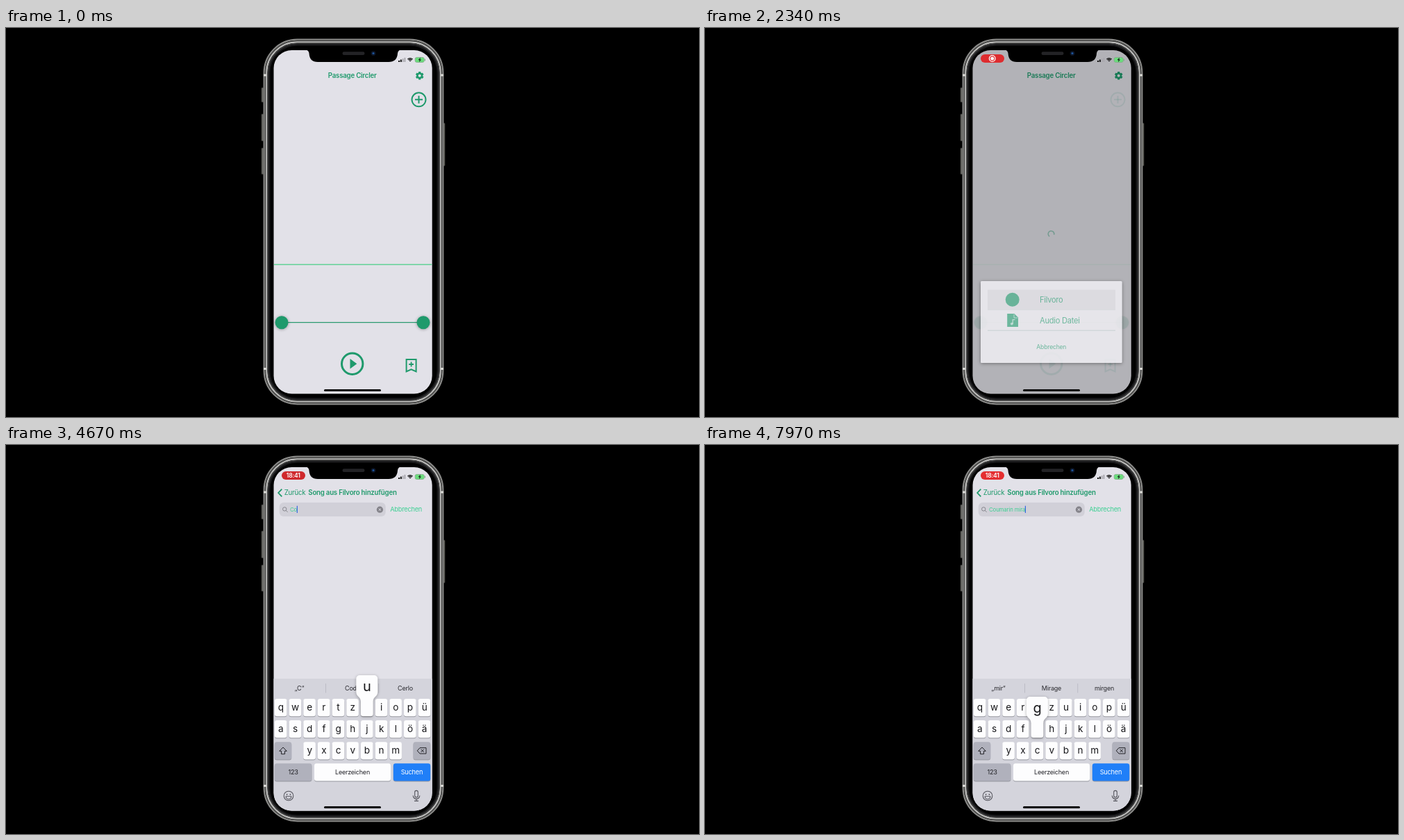
Animation of 998x561 px, one loop 8 s. Source, as an HTML page with a canvas:

```html
<!DOCTYPE html>
<html lang="de">
<head>
<meta charset="utf-8">
<title>Passage Circler</title>
<style>
html, body { margin: 0; width: 100%; height: 100%; overflow: hidden; background: #000; }
canvas { display: block; width: 100%; height: 100%; }
</style>
</head>
<body>
<canvas id="stage" width="998" height="561"></canvas>
<script>
const ctx = document.getElementById('stage').getContext('2d');
const LOOP = 8000, TAU = Math.PI * 2;
const GREEN = '#1f9a6c', MINT = '#3dcf93', PAPER = '#e2e1e8', CARD = '#f0eff3';
const SERVICE = 'Filvoro';
const ROWS = ['qwertzuiopü', 'asdfghjklöä', 'yxcvbnm'];
const PHRASE = 'Coumarin mirag';
const PRESSES = [3960, 4300, 4620, 4990, 5320, 5690, 5960, 6230, 6540, 6880, 7160, 7420, 7690, 7920];
const INSERT = 100, HOLD = 130, LAG = 280;
const HINTS = {
  C: ['Code', 'Cerlo'], Co: ['Code', 'Cool'], Cou: ['Couch', 'Coupon'], Coum: ['Coumarin', 'Comma'],
  Couma: ['Coumarin', ''], Coumar: ['Coumarin', ''], Coumari: ['Coumarin', ''], Coumarin: ['Coumarins', ''],
  m: ['mit', 'mir'], mi: ['mit', 'mir'], mir: ['Mirage', 'mirgen'], mira: ['Mirage', 'mirakel']
};

const clamp = v => Math.max(0, Math.min(1, v));
const ramp = (t, a, b) => clamp((t - a) / (b - a));
const smooth = p => p * p * (3 - 2 * p);
const easeOut = p => 1 - (1 - p) ** 3;
const mix = (a, b, p) => a + (b - a) * p;

function rr(x, y, w, h, r, fill, stroke, lw = 1) {
  ctx.beginPath();
  ctx.roundRect(x, y, w, h, r);
  paint(fill, stroke, lw);
}
function paint(fill, stroke, lw = 1) {
  if (fill) { ctx.fillStyle = fill; ctx.fill(); }
  if (stroke) { ctx.strokeStyle = stroke; ctx.lineWidth = lw; ctx.stroke(); }
}
function circle(x, y, r, fill, stroke, lw) {
  ctx.beginPath();
  ctx.arc(x, y, r, 0, TAU);
  paint(fill, stroke, lw);
}
function poly(points, stroke, lw, fill) {
  ctx.beginPath();
  points.forEach(([x, y], i) => i ? ctx.lineTo(x, y) : ctx.moveTo(x, y));
  if (fill) ctx.closePath();
  paint(fill, stroke, lw);
}
const line = (x1, y1, x2, y2, color, lw = 1) => poly([[x1, y1], [x2, y2]], color, lw);
function text(s, x, y, size, color, align = 'left', weight = 400) {
  ctx.font = `${weight} ${size}px Inter, sans-serif`;
  ctx.letterSpacing = -size * 0.023 + 'px';
  ctx.textAlign = align;
  ctx.textBaseline = 'alphabetic';
  ctx.fillStyle = color;
  ctx.fillText(s, x, y);
}
function layer(alpha, draw) {
  if (alpha <= 0) return;
  ctx.save();
  ctx.globalAlpha *= alpha;
  draw();
  ctx.restore();
}
function shadow(color, blur, dy = 0) {
  ctx.shadowColor = color;
  ctx.shadowBlur = blur;
  ctx.shadowOffsetY = dy;
}

function phoneBody() {
  [[86, 21], [124, 39], [173, 38]].forEach(([y, h]) => rr(368, y, 3.5, h, 1, '#73736f', '#30302e', 0.8));
  rr(629, 137, 3, 62, 1, '#85857f', '#30302e', 0.8);
  rr(370.5, 15.5, 260, 528, 49, '#000');
  // Metal rim, from the outer edge inwards: inset, colour, width
  const rim = [[1.2, '#8c8c8a', 2.2], [3, '#4a4a49', 1.5], [4.8, '#bcbcba', 2.3], [6.9, '#3a3a3b', 2], [8.9, '#19191b', 2]];
  for (const [d, color, w] of rim) rr(370.5 + d, 15.5 + d, 260 - 2 * d, 528 - 2 * d, 49 - d, null, color, w);
  [68, 491.5].forEach(y => [371, 626].forEach(x => {
    ctx.fillStyle = '#d9d9d5';
    ctx.fillRect(x, y - 1.5, 4, 3);
  }));
}

function notch() {
  ctx.beginPath();
  ctx.moveTo(431, 31);
  ctx.quadraticCurveTo(436, 32, 436.5, 36.5);
  ctx.bezierCurveTo(437, 45, 441, 49, 449, 49);
  ctx.lineTo(551, 49);
  ctx.bezierCurveTo(559, 49, 563.5, 45, 564, 36.5);
  ctx.quadraticCurveTo(564.5, 32, 569, 31);
  paint('#000');
  rr(484.5, 34.3, 32, 4.8, 2.4, '#232326');
  circle(529, 36.6, 3.4, '#0c1526');
  circle(529, 36.6, 1.5, '#1e559b');
}

function statusBar(t) {
  for (let i = 0; i < 4; i++) {
    ctx.fillStyle = i < 2 ? '#111' : '#a9a8ae';
    ctx.fillRect(565 + i * 2.8, 47 - i * 1.4, 2, 2 + i * 1.4);
  }
  for (const r of [1.3, 3.2, 5]) {
    ctx.beginPath();
    ctx.arc(582, 48.6, r, -Math.PI * 0.76, -Math.PI * 0.24);
    paint(null, '#111', 1.3);
  }
  rr(589.2, 42.4, 13, 7, 2.2, '#6ade7c', '#83a98a', 0.8);
  rr(603, 44.4, 1, 3, 0.5, '#83a98a');
  poly([[597, 42.6], [593.5, 46.3], [595.6, 46.3], [594.8, 49.2], [598.2, 45.4], [596.2, 45.4]], null, 0, '#142018');

  layer(ramp(t, 350, 550), () => {
    const glow = 0.5 + 0.5 * Math.cos((t - 2040) / 2000 * TAU);
    rr(397, 38, 34, 12, 6, `rgb(${mix(198, 228, glow)},${mix(38, 46, glow)},${mix(42, 48, glow)})`);
    const clock = ramp(t, 3650, 3800);
    layer(1 - clock, () => {
      circle(413.7, 44, 4.3, null, '#fff', 1.3);
      circle(413.7, 44, 2.5, '#fff');
    });
    layer(clock, () => text('18:41', 413.8, 47.1, 8.6, '#fff', 'center', 600));
  });
}

function gear(x, y) {
  for (let i = 0; i < 6; i++) {
    const a = i * TAU / 6 + TAU / 12;
    line(x + 3 * Math.cos(a), y + 3 * Math.sin(a), x + 5.8 * Math.cos(a), y + 5.8 * Math.sin(a), GREEN, 3.2);
  }
  circle(x, y, 3.3, null, GREEN, 2.5);
}

function controls() {
  circle(594.5, 103.3, 10, null, GREEN, 2);
  line(589, 103.3, 600, 103.3, GREEN, 2);
  line(594.5, 97.8, 594.5, 108.8, GREEN, 2);
  line(386, 341.2, 613.5, 341.2, '#48cf86', 1.2);
  line(397, 424.6, 601, 424.6, '#2b9a70', 1.4);
  for (const x of [397, 601]) {
    ctx.save();
    shadow('rgba(0,0,0,.35)', 4, 0.6);
    circle(x, 424.8, 9.5, GREEN);
    ctx.restore();
  }
  circle(498.7, 484.2, 15.2, null, GREEN, 3);
  poly([[495.5, 477], [495.5, 491.4], [505.3, 484.2]], null, 0, GREEN);
  poly([[576.6, 478], [590.6, 478], [590.6, 495.5], [583.6, 492.3], [576.6, 495.5]], GREEN, 2, 'transparent');
  line(580.2, 485, 587, 485, GREEN, 1.8);
  line(583.6, 481.6, 583.6, 488.4, GREEN, 1.8);
}

function home(t) {
  ctx.fillStyle = PAPER;
  ctx.fillRect(385, 31, 229, 498);
  text('Passage Circler', 498.7, 72.4, 9.7, GREEN, 'center', 600);
  gear(595.7, 68.8);
  const busy = smooth(ramp(t, 880, 1080));
  layer(mix(1, 0.11, busy), controls);
  layer(busy * 0.4, () => {
    const a = t / 1000 * TAU;
    ctx.beginPath();
    ctx.arc(498.5, 297, 4.3, a, a + 4.4);
    paint(null, GREEN, 1.6);
  });
}

function card() {
  const [x, y, w, h] = [397, 365, 203.5, 118];
  // The shadow stays outside, so the see-through card is not darkened by it.
  ctx.save();
  ctx.beginPath();
  ctx.rect(x - 20, y - 20, w + 40, h + 40);
  ctx.rect(x, y, w, h);
  ctx.clip('evenodd');
  shadow('rgba(0,0,0,.45)', 5, 1);
  rr(x, y, w, h, 1.5, CARD);
  ctx.restore();
  rr(x, y, w, h, 1.5, CARD);
}

function menu(t) {
  layer(ramp(t, 2130, 2200), () => {
    ctx.fillStyle = 'rgba(70,70,90,.1)';
    ctx.fillRect(407, 377.5, 184, 28.8);
  });
  line(407, 406.5, 591, 406.5, '#cfd5d6', 0.8);
  line(407, 436.2, 591, 436.2, '#a5bbb6', 0.8);
  circle(442.7, 391.8, 10, GREEN);
  text(SERVICE, 482, 396, 11.1, GREEN);
  poly([[435.2, 412], [445.5, 412], [451, 417.5], [451, 431], [435.2, 431]], null, 0, GREEN);
  poly([[445, 412.8], [445, 418], [450.4, 418]], CARD, 1);
  circle(441.8, 426.6, 1.9, CARD);
  poly([[443.2, 426.5], [443.2, 420.6], [446.4, 420.6]], CARD, 1.4);
  text('Audio Datei', 482, 425.5, 11.1, GREEN);
  text('Abbrechen', 498.8, 463.3, 8.6, GREEN, 'center');
}

function dialog(t) {
  const enter = ramp(t, 1040, 1200), leave = ramp(t, 2280, 2490);
  const p = enter * (1 - leave);
  if (!p) return;
  layer(p * 0.3, () => {
    ctx.fillStyle = '#000';
    ctx.fillRect(385, 31, 229, 498);
  });
  ctx.save();
  const s = mix(0.87, 1, enter);
  ctx.translate(498.7, 424);
  ctx.scale(s, s);
  ctx.translate(-498.7, -424);
  layer(Math.sqrt(p), card);
  layer(p * 0.85, () => menu(t));
  ctx.restore();
}

function typedAt(t) {
  return PHRASE.slice(0, PRESSES.filter(p => t >= p + INSERT).length);
}

function searchPage(t) {
  ctx.fillStyle = PAPER;
  ctx.fillRect(385, 31, 229, 498);
  poly([[397.3, 63.6], [392.2, 69], [397.3, 74.4]], GREEN, 1.8);
  text('Zurück', 400.7, 72.4, 9.7, GREEN);
  text(`Song aus ${SERVICE} hinzufügen`, 435.3, 72.4, 9.7, GREEN, 'left', 600);

  const focus = easeOut(ramp(t, 3090, 3450));
  rr(393.7, 83, mix(206.6, 153, focus), 20, 6, '#d1d0d8');
  circle(401.2, 92.4, 2.7, null, '#85848b', 1);
  line(403.2, 94.4, 405.6, 96.8, '#85848b', 1);
  const typed = typedAt(t);
  text(typed || 'Such nach einem Lied', 409, 95.9, 7.9, typed ? MINT : '#919097');
  if (t > 2950) {
    const caret = 409 + (typed ? ctx.measureText(typed).width : 0);
    line(caret + 0.2, 87.8, caret + 0.2, 98, '#3567df', 1.2);
  }
  layer(typed ? 1 : 0, () => {
    circle(538.4, 93.2, 4.6, '#838289');
    line(536.7, 91.5, 540.1, 94.9, PAPER, 1);
    line(540.1, 91.5, 536.7, 94.9, PAPER, 1);
  });
  layer(focus, () => text('Abbrechen', mix(613, 553.2, focus), 96.3, 9.2, MINT));
  if (t > 2990) keyboard(t);
}

function keyCap(x, y, w, fill = '#fdfdfe') {
  rr(x, y + 1, w, 25.2, 3.2, '#96979f');
  rr(x, y, w, 25.2, 3.2, fill);
}

const keyX = i => 395.7 + i * 20.68;

function findKey(ch) {
  const row = ROWS.findIndex(r => r.includes(ch));
  return { x: keyX(ROWS[row].indexOf(ch) + (row === 2 ? 2 : 0)), y: 366 + row * 31.1 };
}

function popup(ch) {
  const { x, y } = findKey(ch.toLowerCase());
  const hx = Math.max(x, 402.5), l = hx - 15.5, r = hx + 15.5, kl = x - 8.8, kr = x + 8.8, top = y - 34;
  ctx.save();
  shadow('rgba(0,0,0,.3)', 4, 1);
  ctx.beginPath();
  ctx.moveTo(l + 5, top);
  ctx.arcTo(r, top, r, top + 5, 5);
  ctx.lineTo(r, top + 24);
  ctx.bezierCurveTo(r, top + 31, kr, top + 31, kr, top + 38);
  ctx.arcTo(kr, y + 25, kr - 4, y + 25, 3.5);
  ctx.arcTo(kl, y + 25, kl, y + 20, 3.5);
  ctx.lineTo(kl, top + 38);
  ctx.bezierCurveTo(kl, top + 31, l, top + 31, l, top + 24);
  ctx.arcTo(l, top, l + 5, top, 5);
  ctx.closePath();
  paint('#fdfdfe');
  ctx.restore();
  text(ch, hx, top + 22.5, 20, '#17171a', 'center');
}

function hintsFor(typed) {
  const word = typed.split(' ').pop();
  return word ? [`„${word}“`, ...(HINTS[word] || ['', ''])] : ['', '', ''];
}

function suggestions(t) {
  const next = hintsFor(typedAt(t - LAG)), prev = hintsFor(typedAt(t - LAG - 120));
  const last = PRESSES.filter(p => t >= p + INSERT + LAG).pop() || 0;
  const p = ramp(t, last + INSERT + LAG, last + INSERT + LAG + 120);
  [422.5, 499, 575].forEach((x, i) => {
    const draw = s => text(s, x, 354.3, 9, '#2b2b30', 'center');
    if (prev[i] === next[i]) return draw(next[i]);
    layer(1 - p, () => draw(prev[i]));
    layer(p, () => draw(next[i]));
  });
  [460.5, 536.7].forEach(x => line(x, 344, x, 357.5, '#b6b6bf', 0.8));
}

function shiftIcon(x, y) {
  poly([[x, y - 5], [x + 5.3, y + 0.4], [x + 2.5, y + 0.4], [x + 2.5, y + 4.7],
    [x - 2.5, y + 4.7], [x - 2.5, y + 0.4], [x - 5.3, y + 0.4]], '#222227', 1, 'transparent');
}

function keyboard(t) {
  ctx.save();
  ctx.translate(0, 191 * (1 - smooth(ramp(t, 3015, 3330))));
  ctx.fillStyle = '#d4d4dc';
  ctx.fillRect(385, 337, 229, 192);
  suggestions(t);
  const upper = t < PRESSES[0] + INSERT;
  ROWS.forEach((row, r) => [...row].forEach((ch, i) => {
    const x = keyX(i + (r === 2 ? 2 : 0)), y = 366 + r * 31.1;
    keyCap(x - 8.8, y, 17.6);
    text(upper ? ch.toUpperCase() : ch, x, y + 16.6, upper ? 12.8 : 13.6, '#17171a', 'center');
  }));
  const grey = '#b0b1bc';
  keyCap(386.8, 428.2, 24.4, upper ? '#fdfdfe' : grey);
  shiftIcon(399, 441);
  keyCap(586.6, 428.2, 24.6, grey);
  poly([[592.3, 440.9], [596, 436.7], [605, 436.7], [605, 445.1], [596, 445.1]], '#222227', 1, 'transparent');
  line(597.6, 438.8, 601.8, 443, '#222227');
  line(601.8, 438.8, 597.6, 443, '#222227');

  const index = PRESSES.findIndex(p => t >= p && t < p + HOLD);
  const active = index < 0 ? '' : PHRASE[index];
  keyCap(386.8, 459.2, 53.6, grey);
  text('123', 413.6, 475, 9.2, '#222227', 'center');
  keyCap(444, 459.2, 110, active === ' ' ? grey : undefined);
  text('Leerzeichen', 499, 474.6, 9, '#222227', 'center');
  keyCap(557.8, 459.2, 53.4, '#207ff8');
  text('Suchen', 584.4, 474.6, 9.2, '#fff', 'center');

  const ink = '#55555d';
  circle(407, 506, 6.8, null, ink, 1.1);
  circle(404.6, 504, 0.9, ink);
  circle(409.4, 504, 0.9, ink);
  ctx.beginPath();
  ctx.arc(407, 506.8, 3.9, 0, Math.PI);
  ctx.closePath();
  paint(null, ink, 1.1);
  rr(588.7, 498.4, 4.6, 9.6, 2.3, null, ink, 1.1);
  ctx.beginPath();
  ctx.arc(591, 505.6, 4.8, 0, Math.PI);
  paint(null, ink, 1.1);
  line(591, 510.4, 591, 513.4, ink, 1.1);
  line(588, 513.4, 594, 513.4, ink, 1.1);

  if (active && active !== ' ') popup(active);
  ctx.restore();
}

function render(t) {
  ctx.setTransform(1, 0, 0, 1, 0, 0);
  ctx.fillStyle = '#000';
  ctx.fillRect(0, 0, 998, 561);
  phoneBody();
  ctx.save();
  ctx.beginPath();
  ctx.roundRect(385.5, 32, 228.2, 495.6, 26);
  ctx.clip();
  const push = easeOut(ramp(t, 2500, 2900));
  if (push < 1) {
    ctx.save();
    ctx.translate(-70 * push, 0);
    home(t);
    ctx.restore();
    dialog(t);
  }
  if (push > 0) {
    ctx.save();
    ctx.translate(229 * (1 - push), 0);
    searchPage(t);
    ctx.restore();
  }
  statusBar(t);
  rr(458, 521, 82, 3, 1.5, '#050505');
  ctx.restore();
  notch();
}

const start = performance.now();
function tick() {
  render((performance.now() - start) % LOOP);
  requestAnimationFrame(tick);
}
tick();
</script>
</body>
</html>
```
